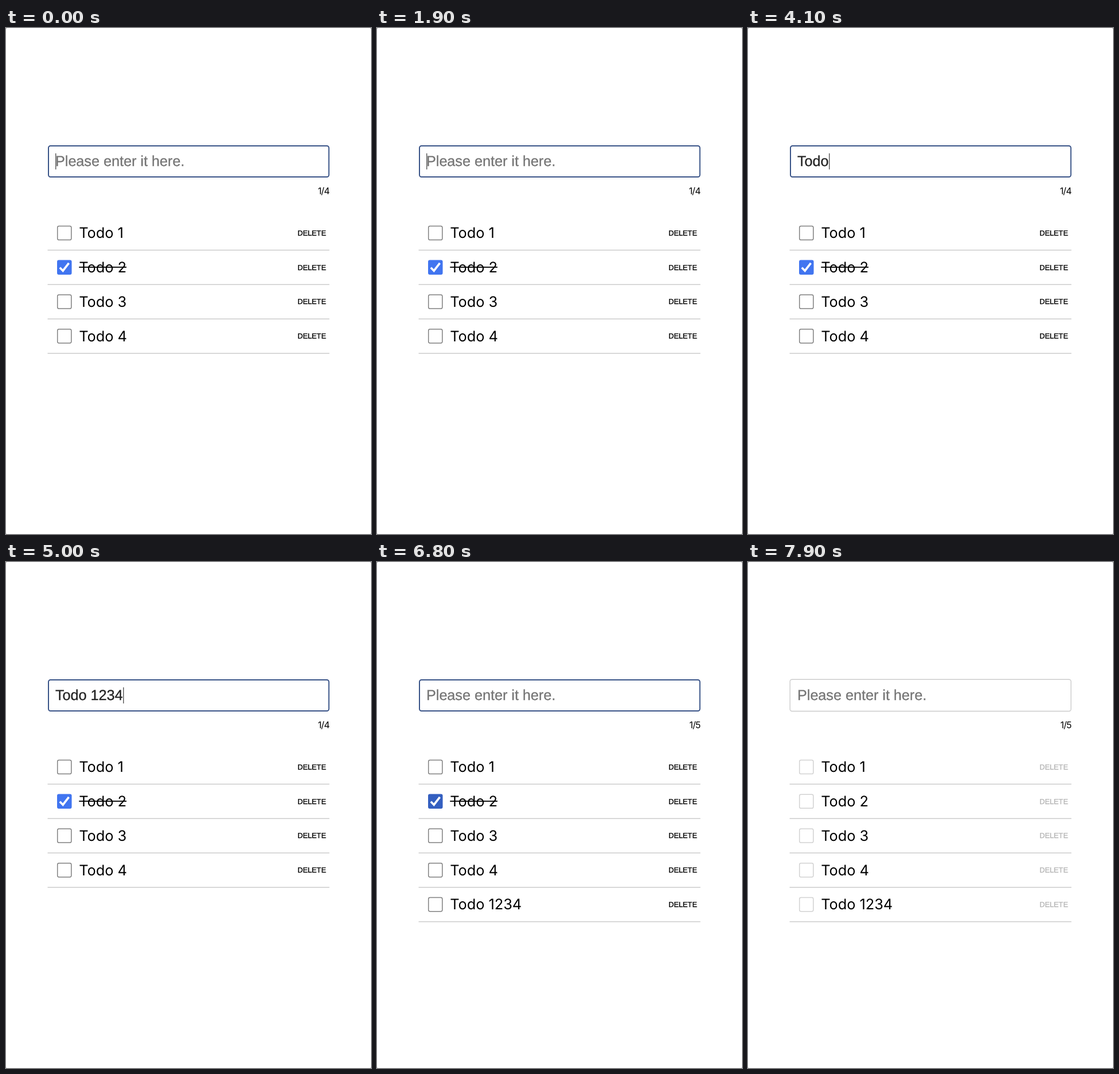
An HTML page with a canvas that plays this animation: 636x880 px, repeating every 8 s.

```html
<!DOCTYPE html>
<html lang="en">
<head>
<meta charset="utf-8">
<title>Todo list</title>
<style>
  html, body { margin: 0; width: 100%; height: 100%; overflow: hidden; background: #fff; }
  canvas { display: block; }
</style>
</head>
<body>
<canvas id="stage" width="636" height="880"></canvas>
<script>
const ctx = document.getElementById('stage').getContext('2d');
const LOOP = 8000;
const ZOOM = 1.59; // the page is laid out in CSS pixels and shown enlarged
const LEFT = 72.5, RIGHT = 563.5;
const ROW_TOP = 356.4, ROW_STEP = 59.8;
const UI = '"Inter", sans-serif';
const FIELD = '"Liberation Sans", Arial, sans-serif';
const LINE = '#cccccc';

// time of each key press and the text it leaves in the field
const typing = [
  [3700, 'T'], [3900, 'To'], [4000, 'Tod'], [4100, 'Todo'], [4200, 'Todo '],
  [4600, 'Todo 1'], [4700, 'Todo 12'], [4800, 'Todo 123'], [5000, 'Todo 1234']
];

// Draws text and returns its width in stage pixels.
function text(str, x, y, { size, family, color, align = 'left', spacing = 0 }) {
  ctx.save();
  ctx.translate(x, y);
  ctx.scale(ZOOM, ZOOM);
  ctx.font = `${size / ZOOM}px ${family}`;
  ctx.textRendering = 'geometricPrecision';
  ctx.fontKerning = 'normal';
  ctx.letterSpacing = `${spacing}px`;
  ctx.textAlign = align;
  ctx.fillStyle = ctx.strokeStyle = color;
  ctx.fillText(str, 0, 0);
  if (family === FIELD) { // slightly heavier strokes
    ctx.lineWidth = 0.2;
    ctx.strokeText(str, 0, 0);
  }
  const width = ctx.measureText(str).width * ZOOM;
  ctx.restore();
  return width;
}

function box(x, y, w, h, r) {
  ctx.beginPath();
  ctx.roundRect(x, y, w, h, r);
}

function rect(x, y, w, h, color) {
  ctx.fillStyle = color;
  ctx.fillRect(x, y, w, h);
}

function drawField({ value, focused, disabled, caret }) {
  if (focused) box(74, 205, 488.6, 54, 3.5);
  else box(73.2, 204.3, 489.6, 55.2, 3.5);
  ctx.lineWidth = focused ? 2 : 1.4;
  ctx.strokeStyle = focused ? '#3a5488' : LINE;
  ctx.stroke();

  const color = !value ? '#757575' : disabled ? '#cfcfcf' : '#222222';
  const width = text(value || 'Please enter it here.', 86, 240.3, { size: 25.2, family: FIELD, color });
  if (caret) rect(Math.round(86 + (value ? width : 0)), 218, 1.4, 28, '#555555');
}

function drawCheckbox(y, { checked, hover, disabled }) {
  if (checked) {
    box(89, y - 12.7, 25.5, 25.5, 3);
    ctx.fillStyle = hover ? '#345fc0' : '#4175f0';
    ctx.fill();
    ctx.beginPath();
    ctx.moveTo(93.8, y + 0.6);
    ctx.lineTo(99.2, y + 6);
    ctx.lineTo(109.5, y - 7.4);
    ctx.lineWidth = 3.6;
    ctx.strokeStyle = '#ffffff';
    ctx.stroke();
    return;
  }
  box(89.7, y - 12, 24.1, 24.1, 2.6);
  ctx.lineWidth = 1.5;
  ctx.strokeStyle = disabled ? '#d2d2d2' : hover ? '#505050' : '#808080';
  ctx.stroke();
}

function drawRow(label, index, state) {
  const y = ROW_TOP + index * ROW_STEP;
  drawCheckbox(y, state);
  const width = text(label, 127.2, y + 8.8, { size: 25.3, family: UI, color: '#000000' });
  if (state.checked) rect(127.2, y - 1.1, width, 1.8, '#000000');
  text('DELETE', 557.7, y + 4.4, {
    size: 12.8, family: FIELD, color: state.disabled ? '#b5b5b5' : '#000000', align: 'right'
  });
  rect(LEFT, y + 29.2, RIGHT - LEFT, 1.5, LINE);
}

function drawBone(x, y, h, shineFrom, shineTo) {
  ctx.save();
  box(x, y, RIGHT - x, h, h / 2);
  ctx.clip();
  rect(x, y, RIGHT - x, h, '#eeeeee');
  rect(shineFrom, y, shineTo - shineFrom, h, '#f2f2f2');
  ctx.restore();
}

function drawSkeleton() {
  drawBone(513, 277, 17, 513, 545);
  for (let i = 0; i < 5; i++) drawBone(LEFT, 344 + i * 58.75, 25.3, 112, 382);
}

function drawList(t) {
  const added = t >= 6300;
  const disabled = t >= 7700;
  const labels = ['Todo 1', 'Todo 2', 'Todo 3', 'Todo 4'];
  if (added) labels.push('Todo 1234');
  const hovered = t >= 6800 ? 1 : t >= 6700 ? 2 : -1;

  text(`1/${labels.length}`, RIGHT, 289.3, {
    size: 15.9, family: UI, color: '#000000', align: 'right', spacing: -0.5
  });
  labels.forEach((label, i) => drawRow(label, i, {
    checked: i === 1 && !disabled,
    hover: i === hovered,
    disabled
  }));
}

function fieldState(t) {
  const loading = t >= 600 && t < 1900;
  const saving = t >= 5300 && t < 6300;
  const disabled = loading || saving || t >= 7700;
  let value = '';
  if (t < 6300) for (const [at, str] of typing) if (t >= at) value = str;

  // the caret blinks from the moment the field gains focus
  const since = t >= 6300 ? t - 6300 : t >= 1900 ? t - 1900 : 0;
  const caretOn = value !== '' || Math.floor(since / 500) % 2 === 0;
  return { value, disabled, focused: !disabled, caret: !disabled && caretOn };
}

function draw(t) {
  rect(0, 0, 636, 880, '#ffffff');
  for (const x of [0, 635]) {
    rect(x, 0, 1, 1, '#999999');
    rect(x, 879, 1, 1, '#cccccc');
  }
  drawField(fieldState(t));
  if (t >= 600 && t < 1900) drawSkeleton();
  else drawList(t);
}

const start = performance.now();
function frame() {
  draw((performance.now() - start) % LOOP);
  requestAnimationFrame(frame);
}
frame();
</script>
</body>
</html>
```
